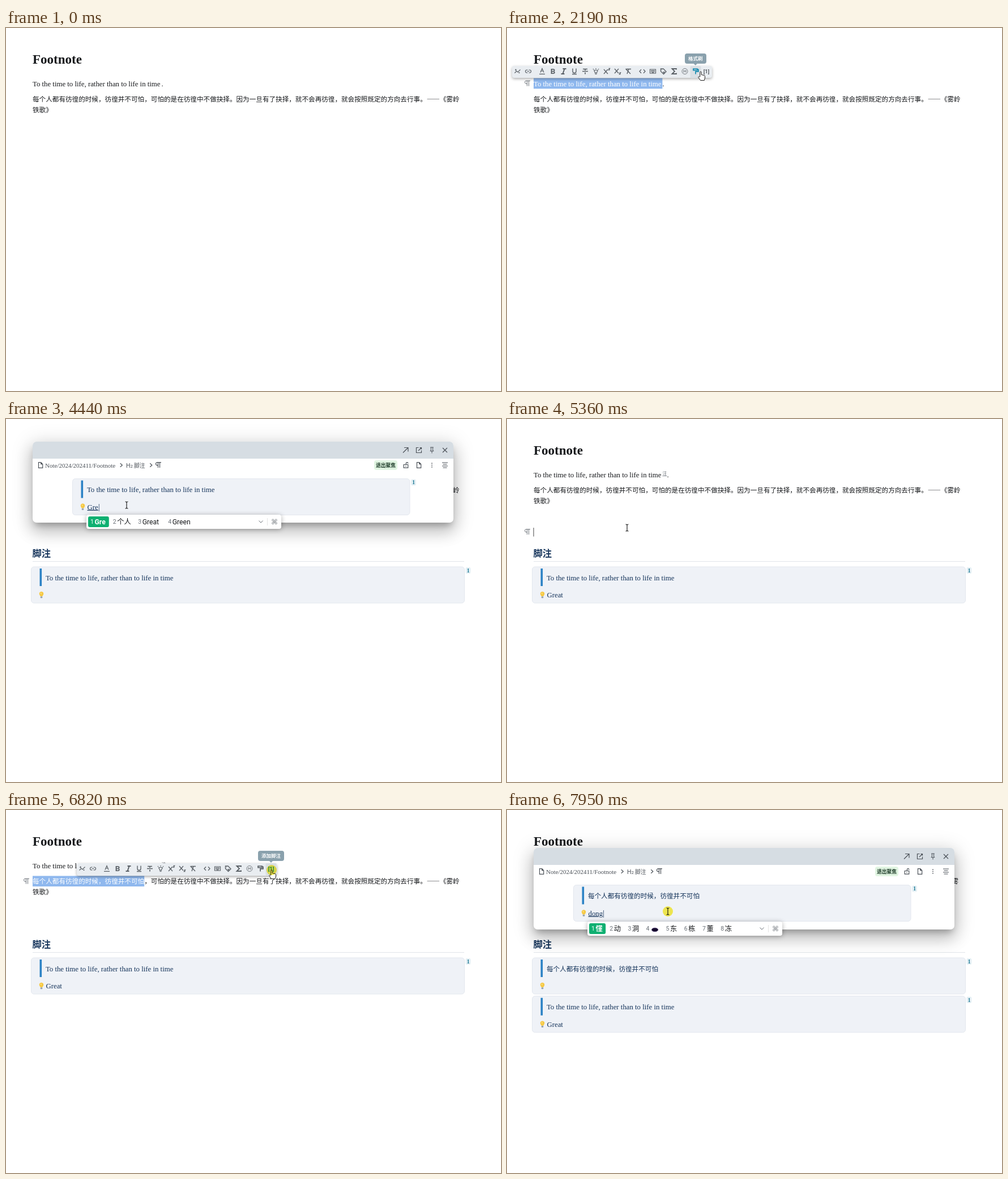
Recreate the animation shown at these times as an HTML page. Size 874 by 641 pixels, loop 8000 ms.

```html
<!DOCTYPE html>
<html lang="zh-CN">
<head>
<meta charset="utf-8">
<title>Footnote</title>
<style>
html, body { margin: 0; width: 100%; height: 100%; overflow: hidden; background: #fff; }
svg { position: absolute; overflow: visible; }
text { font-family: "Liberation Serif", serif; fill: currentColor; white-space: pre; }
.zh { font-family: "Noto Sans CJK SC", "Noto Sans CJK", sans-serif; text-spacing-trim: space-all; }
.sans { font-family: Roboto, sans-serif; }
.b { font-weight: bold; }
.mid { text-anchor: middle; }
.ink { color: #16181b; }
.navy { color: #14335a; }
.white { color: #fff; }
.grey { color: #6a7077; }
.icon { fill: none; stroke: currentColor; stroke-width: 1.2; }
.bar { background: #e9edf1; border-radius: 4px; color: #5a6066; box-shadow: 0 2px 5px rgba(0,0,0,.32); }
.tip { background: #8aa1ad; border-radius: 4px; color: #fff; }
.popup { background: #fff; border-radius: 7px; color: #4b5158;
  box-shadow: 0 8px 12px -4px rgba(0,0,0,.26), 0 16px 28px 2px rgba(0,0,0,.16), 0 6px 34px 6px rgba(0,0,0,.13); }
.ime { background: #fff; border-radius: 4px; color: #222; box-shadow: 0 1px 8px rgba(0,0,0,.32); }
.click { mix-blend-mode: multiply; }
</style>
</head>
<body>
<div id="stage"></div>
<script>
const LOOP = 8000;
const QUOTE = 'To the time to life, rather than to life in time';
const START = '每个人都有彷徨的时候，彷徨并不可怕';
const REST = '，可怕的是在彷徨中不做抉择。因为一旦有了抉择，就不会再彷徨，就会按照既定的方向去行事。——《雾';
const LEFT = 47, QUOTE_END = 274.4, START_END = 244.2;

// Pointer path: time, x, y
const PATH = [
  [70, 28, 249], [400, 143, 196], [720, 287, 103], [860, 277, 100], [920, 277, 100],
  [1180, 31, 101], [1449, 31, 101], [1450, 33, 101], [1600, 36, 99], [1780, 60, 88],
  [1920, 60, 86], [2190, 342, 77], [2300, 343, 77], [2400, 352, 76], [2730, 352, 76],
  [3130, 215, 160], [3270, 213, 152], [5359, 213, 152], [5360, 212, 192], [5420, 212, 192],
  [5550, 100, 150], [5810, 100, 150], [5990, 48, 127], [6040, 48, 127], [6270, 245, 127],
  [6330, 245, 127], [6550, 466, 104], [6620, 466, 104], [6800, 469, 106], [6950, 469, 106],
  [7420, 284, 179], [LOOP, 284, 179]
];

// Typing: time, composed text, candidates
const TYPING = [
  [4110, 'G', 'G 个 给 该 过 高 国 更'],
  [4220, 'Gr', 'Gr 个人 工人 果然 感染 骨肉'],
  [4360, 'Gre', 'Gre 个人 Great Green'],
  [4500, 'Grea', 'Grea Great Greater'],
  [4700, 'Great', 'Great Greatly Greater'],
  [5100, 'Great', ''],
  [5360, '', ''],
  [7600, 'd', '的 大 到 都 地 得 等 点'],
  [7720, 'do', '都 多 动 东 懂 夺 朵 躲'],
  [7830, 'don', '懂 动 洞 ● 东 栋 董 冻'],
  [7950, 'dong', '懂 动 洞 ● 东 栋 董 冻']
];

const TOOLS = [
  [9.5, 'M-5 3L-1.5-.5 .5 1.5 5-3M-3-4v3M-4.5-2.5h3M3 1.5v2M2 2.5h2'],
  [28.5, 'M-1-2.5h-1.5a2.5 2.5 0 0 0 0 5H-1M1-2.5h1.5a2.5 2.5 0 0 1 0 5H1M-2 0H2'],
  [53, 'M-3 2L0-5 3 2M-2-.5H2M-5 4.8H5'],
  [72, 'B'],
  [91, 'M-1.5-4.5H4.5M-4.5 4.5H1.5M1.5-4.5L-1.5 4.5', 2],
  [110, 'M-3-5V0a3 3 0 0 0 6 0V-5M-4 5H4', 1.4],
  [129, 'M-4-4H4M0-4V-1.5M-5 0H5M0 2V5', 1.7],
  [148, 'M-1.5 5H1.5M-1.5 3.2H1.5V1.5L3-.5V-2H-3V-.5L-1.5 1.5zM0-3.5V-5.5M-4-3L-5-4.5M4-3L5-4.5'],
  [167, 'M-5-3.5L2 4.5M2-3.5L-5 4.5M3.5-5H5.5L3.5-2.5H5.5', 1.3],
  [186, 'M-5-4.5L2 3.5M2-4.5L-5 3.5M3.5 2.5H5.5L3.5 5H5.5', 1.3],
  [205, 'M-3-4H5M1-4L-2 4.5M-4.5-4.5L4 4.5', 1.4],
  [230, 'M-2-3.2L-5 0L-2 3.2M2-3.2L5 0L2 3.2', 1.3],
  [248.5, 'M-5-3.5H5V3.5H-5zM-3.5-1.3h7M-3.5.5h7M-2 2.2h4', 1.2],
  [267, 'M-4.5-4.5H0L5 .5 .5 5-4.5 0zM-2.8-2.8h.6M-.8 1L1 2.5 2 .2', 1.4],
  [286, 'M4-3V-4.5H-3.5L1 0-3.5 4.5H4V3', 1.8],
  [305, 'M-5 0a5 5 0 1 0 10 0a5 5 0 1 0-10 0M-2 2.3V-2L0 .5 2-2V2.3', .8],
  [324, 'M-4-4.5H3V-1.8H-4zM3-3.2H5V.3H0V5', 1.7],
  [343, '[1]']
];
const BRUSH = 16, NOTE = 17;

const PILCROW = 'M-.5 .2H-2a2.5 2.5 0 0 1 0-5H5M-.5-4.8V4.6M2.5-4.8V4.6';
const CHEVRON = 'M-1.8-3.2L1.8 0-1.8 3.2';
const PAGE = 'M-3.5-4.8H.8L3.7-1.8V4.8H-3.5zM.8-4.8V-1.8H3.7';
const HAND = 'M-1.2 9V1.2a1.2 1.2 0 0 1 2.4 0V5.5l5 1.2a1.6 1.6 0 0 1 1.3 1.7V11l-1.2 4.5H-.4L-4 10.5c-.8-1.2 .6-2.2 1.4-1.3z';
const BEAM = 'M-2.5-6q2.5 0 2.5 1.5q0-1.5 2.5-1.5M0-4.5V4.5M-2.5 6q2.5 0 2.5-1.5q0 1.5 2.5 1.5';

const within = (t, a, b) => t >= a && t < b;

function text(x, y, s, cls = '', size) {
  const zh = /[\u3000-\u9fff]/.test(s);
  return `<text x="${x}" y="${y}" font-size="${size || (zh ? 11.6 : 12.8)}" class="${zh ? 'zh' : ''} ${cls}">${s}</text>`;
}
const rect = (x, y, w, h, fill, r = 0, more = '') =>
  `<rect x="${x}" y="${y}" width="${w}" height="${h}" fill="${fill}" rx="${r}" ${more}/>`;
const icon = (x, y, d, cls = '', w = 1.2) =>
  `<path class="icon ${cls}" transform="translate(${x} ${y})" d="${d}" style="stroke-width:${w}"/>`;
const layer = (x, y, w, h, cls, inner) =>
  `<svg class="${cls}" style="left:${x}px;top:${y}px" width="${w}" height="${h}">${inner}</svg>`;

function pointer(t) {
  const i = Math.max(1, PATH.findIndex(p => p[0] > t));
  const [t0, x0, y0] = PATH[i - 1], [t1, x1, y1] = PATH[i];
  const u = Math.min(1, Math.max(0, (t - t0) / (t1 - t0)));
  const k = u * u * (3 - 2 * u);
  return [x0 + (x1 - x0) * k, y0 + (y1 - y0) * k];
}

const mark = (x, y) => text(x, y, '注', 'grey', 7.7) +
  `<path d="M${x} ${y + 1.8}h7.7" stroke="#8b9197" stroke-width=".8"/>`;

function selection(id, x0, x1, y, line) {
  if (x1 <= x0) return '';
  const area = fill => rect(x0, y, x1 - x0, 18.6, fill);
  return `${area('#8fb8ee')}<clipPath id="${id}">${area('#000')}</clipPath>
    <g class="white" clip-path="url(#${id})">${line}</g>`;
}

function bulb(x, y) {
  return `<g transform="translate(${x} ${y})"><path fill="#f6c945" d="M-1.8 2.5L-3.4-.2a3.8 3.8 0 1 1 6.8 0L1.8 2.5z"/>
    <path fill="#fbe28a" d="M-2-2a2 2 0 0 1 2-2v3z"/>${rect(-1.8, 2.7, 3.6, 3, '#98a2ab', 1)}</g>`;
}

function note(x, y, w, quote, reply, badge) {
  const bx = x + w + 6.5;
  return rect(x, y, w, 64, '#eff2f7', 5, 'stroke="#e3e7ee"') +
    rect(x + 15, y + 3, 3.6, 31, '#2b82c5') +
    `<g class="navy">${text(x + 25.4, y + 23.5, quote)}${text(x + 26, y + 54, reply)}</g>` + bulb(x + 18, y + 49.5) +
    (badge ? rect(bx - 4.3, y + 1, 8.6, 11, '#e4eff4', 2) +
      `<g color="#1b7894">${text(bx, y + 9.8, '1', 'b mid', 9.5)}</g>` : '');
}

function page(t, x) {
  const noted = t >= 2600, second = t >= 6950;
  const quote = text(LEFT, 103, QUOTE), start = text(LEFT, 130.2, START);
  let s = text(LEFT, 63.3, 'Footnote', 'b', 23) + quote + start;
  s += text(QUOTE_END + (noted ? 8.1 : 0), 103, '.');
  s += text(START_END + (second ? 8.1 : 0), 130.2, REST + (second ? '' : '岭'));
  s += text(LEFT, 149.4, (second ? '岭' : '') + '铁歌》');
  if (noted) s += mark(QUOTE_END, 99) + text(46.5, 242.8, '脚注', 'b navy', 16.3);
  if (second) s += mark(START_END, 126);
  if (t >= 2730) {
    s += rect(LEFT, 251, 762, 1, '#e0e4e9');
    if (second) s += note(44.5, 261, 765, START, '', t >= 7490);
    s += note(44.5, second ? 328.7 : 261, 765, QUOTE, t >= 5360 ? 'Great' : '', t >= 3790);
  }
  if (within(t, 920, 2600))
    s += selection('s1', t > 1180 ? LEFT : Math.max(LEFT, x), QUOTE_END, 88.6, quote);
  if (within(t, 6040, 6950))
    s += selection('s2', LEFT, t > 6270 ? START_END : Math.min(START_END, x), 116.4, start);
  if (within(t, 1520, 2730)) s += icon(36, 98, PILCROW, 'grey', 1);
  if (within(t, 6040, 6950)) s += icon(36, 126, PILCROW, 'grey', 1);
  if (within(t, 5360, 5550)) s += icon(36, 199.5, PILCROW, 'grey', 1) + rect(46.5, 192, 1, 15.5, '#444');
  return layer(0, 0, 874, 641, 'ink', s);
}

function toolbar(x, y, active) {
  const icons = TOOLS.map(([cx, d, w], i) => {
    const on = i === active;
    const shape = d[0] === 'M' ? icon(cx, 9.5, d, '', w)
      : text(cx, d === 'B' ? 14.2 : 12.8, d, 'sans b mid', d === 'B' ? 13.5 : 9.5);
    return (on ? rect(cx - 9.5, 0, 19, 21.5, '#d9dfe4', 2) : '') + `<g ${on ? 'color="#168bb0"' : ''}>${shape}</g>`;
  }).join('');
  let s = layer(x, y, 353, 21.5, 'bar', icons);
  if (active) {
    const label = active === BRUSH ? '格式刷' : '添加脚注';
    const w = 12 + label.length * 8.5;
    s += layer(x + TOOLS[active][0] - w / 2, y - 22, w, 18, 'tip', text(w / 2, 12.3, label, 'b mid', 8.5) +
      `<path fill="#8aa1ad" d="M${w / 2 - 3} 18h6l-3 3z"/>`);
  }
  return s;
}

function popup(y, quote, typed, composing, focus) {
  const caret = focus ? '<tspan font-size="14.5" text-decoration="none">|</tspan>' : '';
  const reply = (composing ? `<tspan text-decoration="underline">${typed}</tspan>` : typed) + caret;
  return layer(LEFT, y, 743, 143.5, 'popup',
    '<path fill="#d6dde3" d="M0 30V7a7 7 0 0 1 7-7H736a7 7 0 0 1 7 7V30z"/>' +
    icon(658.5, 15, 'M-4.5 4.5L4.5-4.5M-2.5-4.5h7v7') +
    icon(682, 15, 'M-.5-4.5h-4v9h9v-4M-1 1L4.5-4.5M1.5-4.5h3v3') +
    icon(705, 15, 'M-2.8-5h5.6M-1.6-5V0L-3 1.6H3L1.6 0V-5M0 1.6V5.5', '', 1) +
    icon(728, 15, 'M-4-4L4 4M4-4L-4 4') +
    icon(14, 41.5, PAGE) + text(22, 45.5, 'Note/2024/202411/Footnote', '', 11) +
    icon(156.5, 41.5, CHEVRON) + text(165, 45.5, 'H', 'sans', 10.5) + text(172.5, 45.5, '2', 'sans', 8) +
    text(179, 45.5, '脚注', '', 9.8) + icon(209, 41.5, CHEVRON) + icon(222, 41.5, PILCROW) +
    rect(603, 33, 41, 17, '#e1f5e2', 4) + `<g color="#1f3d2a">${text(623.5, 44.8, '退出聚焦', 'b mid', 8.8)}</g>` +
    icon(659, 41.5, 'M-3.8-1H3.8V4.6H-3.8zM0 1V2.5M.3-1V-3a1.8 1.8 0 0 1 3.6 0') + icon(682, 41.5, PAGE) +
    icon(705, 41.5, 'M0-4v1.6M0-.8V.8M0 2.4V4', '', 1.6) +
    icon(728, 41.5, 'M-5-4.5H5M-3.5-1.5h7M-5 1.5H5M-3.5 4.5h7') +
    note(70.5, 65.5, 595.5, quote, reply, focus));
}

function ime(y, words) {
  let x = 7, s = rect(3, 3.2, 0, 0, 'none');
  words.split(' ').forEach((word, i) => {
    const zh = /[\u4e00-\u9fff]/.test(word);
    const w = word === '●' ? 15 : word.length * (zh ? 12.2 : 6.6);
    if (!i) s += rect(3, 3, w + 17, 19, '#0fb071', 3);
    s += `<g class="${i ? 'grey' : 'white'}">${text(x, 16.4, `${i + 1}`, 'sans', 10.5)}</g>`;
    s += word === '●'
      ? `<ellipse cx="${x + 15.5}" cy="14.5" rx="5.6" ry="3.3" fill="#150a2c" stroke="#4a3570" stroke-width=".7"/>`
      : `<g class="${i ? 'ink' : 'white'}">${text(x + 7.5, 17, word, i ? 'sans' : 'sans b', 12.2).replace('zh sans', 'zh')}</g>`;
    x += w + 20;
  });
  const leaf = [-1, 1].map(a => [-1, 1].map(b =>
    `<circle class="icon" cx="${332 + a * 2.7}" cy="${12.3 + b * 2.7}" r="1.6" style="stroke-width:.8"/>`).join('')).join('');
  s += `<g class="grey">${icon(308, 12.3, 'M-3.5-1.8L0 1.8 3.5-1.8', '', 1)}${leaf}` +
    icon(332, 12.3, 'M-1.2-1.2h2.4v2.4h-2.4z', '', .8) + '</g>' + rect(319, 6, .8, 13, '#dddddd');
  return layer(142, y, 344, 24.5, 'ime', s);
}

function scene(t) {
  const [x, y] = pointer(t);
  let s = page(t, x);
  if (within(t, 1520, 2730))
    s += toolbar(9, 66.5, t < 2100 ? 0 : t < 2360 ? BRUSH : NOTE);
  if (within(t, 6340, 6950)) s += toolbar(125, 94, t < 6500 ? 0 : NOTE);

  const first = within(t, 2860, 5360);
  if (first || t >= 7060) {
    const top = first ? 39.7 : 67.3;
    const [, typed, words] = TYPING.filter(k => k[0] <= t).pop() || [0, '', ''];
    s += popup(top, first ? QUOTE : START, typed, words, t >= (first ? 3790 : 7490));
    if (words) s += ime(top + 129.7, words);
  }
  if (t >= 70) {
    const hand = within(t, 1450, 2780) || within(t, 6380, 7020);
    s += layer(x, y, 1, 1, '', hand
      ? `<path d="${HAND}" fill="#fff" stroke="#222"/>`
      : `<path d="${BEAM}" fill="none" stroke="#222" stroke-width="1.2"/>`);
  }
  if (within(t, 2480, 2660) || within(t, 3410, 3850) || within(t, 6700, 6950) || t >= 7490)
    s += layer(x, y, 1, 1, 'click', '<circle r="9" fill="#fdf251"/>');
  return s;
}

const stage = document.getElementById('stage');
let shown = '';
function frame(now) {
  const next = scene(now % LOOP);
  if (next !== shown) stage.innerHTML = shown = next;
  requestAnimationFrame(frame);
}
frame(0);
</script>
</body>
</html>
```
